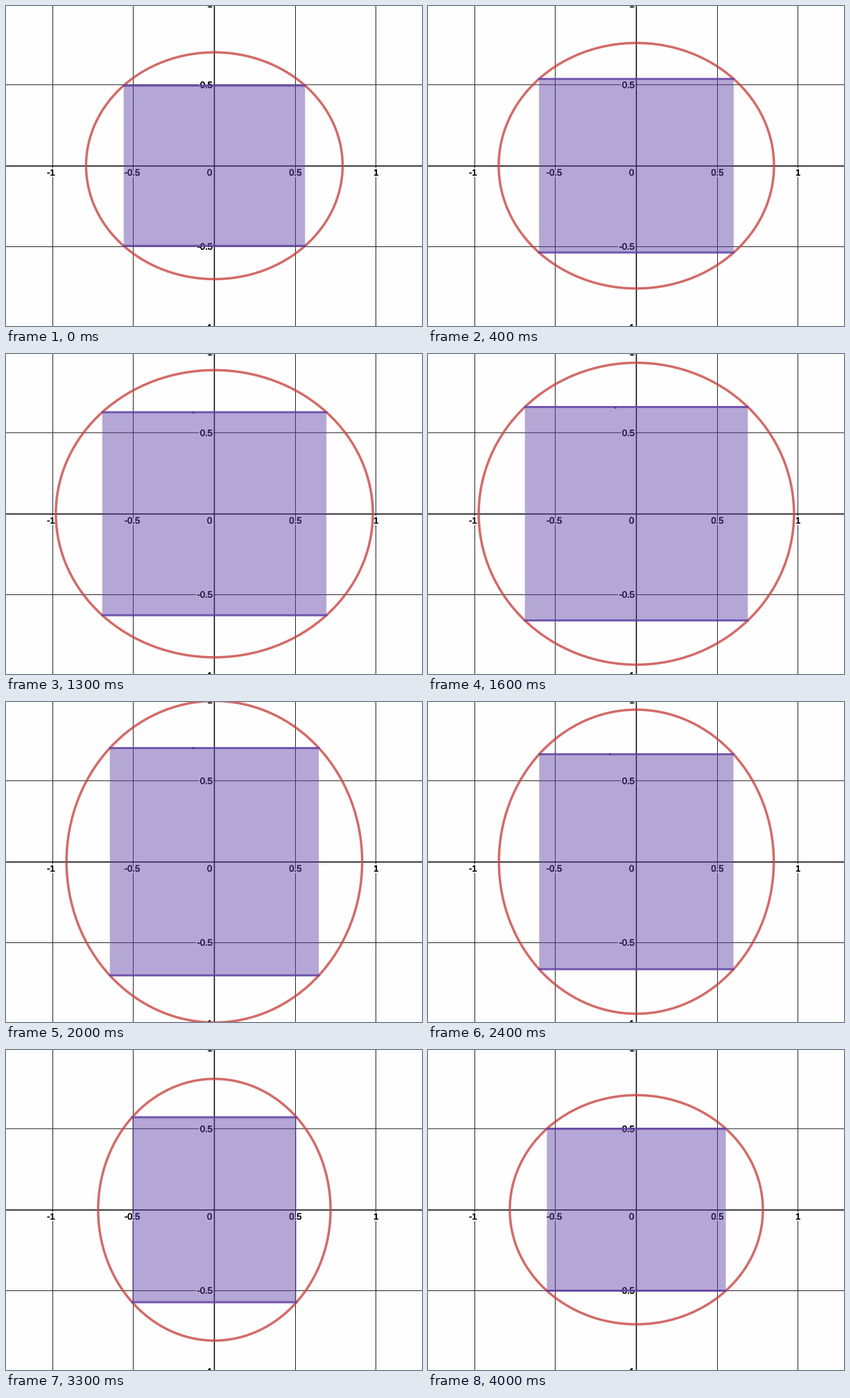
A matplotlib script for the animation above (4100 ms loop, 600x462 px).

```python
import matplotlib.pyplot as plt
import numpy as np
from matplotlib import patheffects
from matplotlib.animation import FuncAnimation
from matplotlib.patches import Ellipse, Rectangle

W, H, DPI = 600, 462, 100
FRAMES, INTERVAL = 41, 100
CX, CY, UNIT = 300.5, 230.6, 233.3
PX = 72 / DPI
RED, PURPLE, PAPER = "#c74440", "#6042a6", "#fefefe"

# Slider bounce: both radii run linearly between LOW and UNIT, out of phase.
LOW, SWEEP = 0.7 * UNIT, 0.3 * UNIT
PEAK_X, PEAK_Y = 48.3, 69.6
KEY_FRAMES = [0, 6, 8, 12, 13, 20, 24, 30, 33, 36, 40, 41]
KEY_TRAVEL = [0, 20.3, 28, 42, 43.6, 68.4, 83.4, 103.1, 114, 125.3, 137.5, 140]

fig = plt.figure(figsize=(W / DPI, H / DPI), dpi=DPI, facecolor=PAPER)
ax = fig.add_axes([0, 0, 1, 1])
ax.set_xlim(0, W)
ax.set_ylim(H, 0)
ax.axis("off")


def line(xs, ys, width, color="black", **kw):
    return ax.plot(xs, ys, color=color, lw=width * PX, snap=False, **kw)[0]


def label(text, x, baseline, align="center"):
    halo = patheffects.withStroke(linewidth=4 * PX, foreground=PAPER)
    weight = patheffects.withStroke(linewidth=0.35 * PX, foreground="black")
    ax.text(x, baseline, text, ha=align, va="baseline", color="black",
            family="Liberation Sans", fontsize=13 * PX, zorder=3,
            path_effects=[halo, weight])


def draw_grid():
    for x in (67.5, 183.5, 417.5, 533.5):
        line([x, x], [0, H], 1, "#262626", zorder=1)
    for y in (113.7, 347.5):
        line([0, W], [y, y], 1, "#262626", zorder=1)
    line([CX, CX], [0, H], 1.5, zorder=2)
    line([0, W], [231, 231], 1.5, zorder=2)

    for text, x in (("-1", 65), ("-0.5", 182), ("0", 293.7),
                    ("0.5", 417.3), ("1", 533.8)):
        label(text, x, 244.8)
    for text, y in (("1", 2), ("0.5", 118.3), ("-0.5", 351.7), ("-1", 468.5)):
        label(text, 297.8, y, "right")


def radius(travel, peak):
    gap = abs((travel - peak + SWEEP) % (2 * SWEEP) - SWEEP)
    return LOW + SWEEP - gap


draw_grid()
fill = Rectangle((0, 0), 1, 1, fc=PURPLE, alpha=0.46, lw=0, zorder=4, snap=False)
oval = Ellipse((CX, CY), 1, 1, fill=False, ec=RED, alpha=0.79,
               lw=3.5 * PX, zorder=5)
ax.add_patch(fill)
ax.add_patch(oval)
edges = [line([], [], 3, PURPLE, alpha=0.85, zorder=6,
              solid_capstyle="round") for _ in range(2)]
speck = ax.plot([], [], "o", ms=3 * PX, mew=0, color="#4a3092", zorder=7)[0]


def update(i):
    travel = np.interp(i, KEY_FRAMES, KEY_TRAVEL)
    a, b = radius(travel, PEAK_X), radius(travel, PEAK_Y)
    w, h = a / np.sqrt(2), b / np.sqrt(2)
    oval.set_width(2 * a)
    oval.set_height(2 * b)
    fill.set_bounds(CX - w, CY - h, 2 * w, 2 * h)
    for edge, y in zip(edges, (CY - h, CY + h)):
        edge.set_data([CX - w, CX + w], [y, y])
    speck.set_data([np.interp(i, [20, 24], [270, 262])], [CY - h])
    speck.set_visible(13 <= i <= 24)
    return [fill, oval, *edges, speck]


anim = FuncAnimation(fig, update, frames=FRAMES, interval=INTERVAL,
                     repeat=True, repeat_delay=0, blit=False)
plt.show()
```
